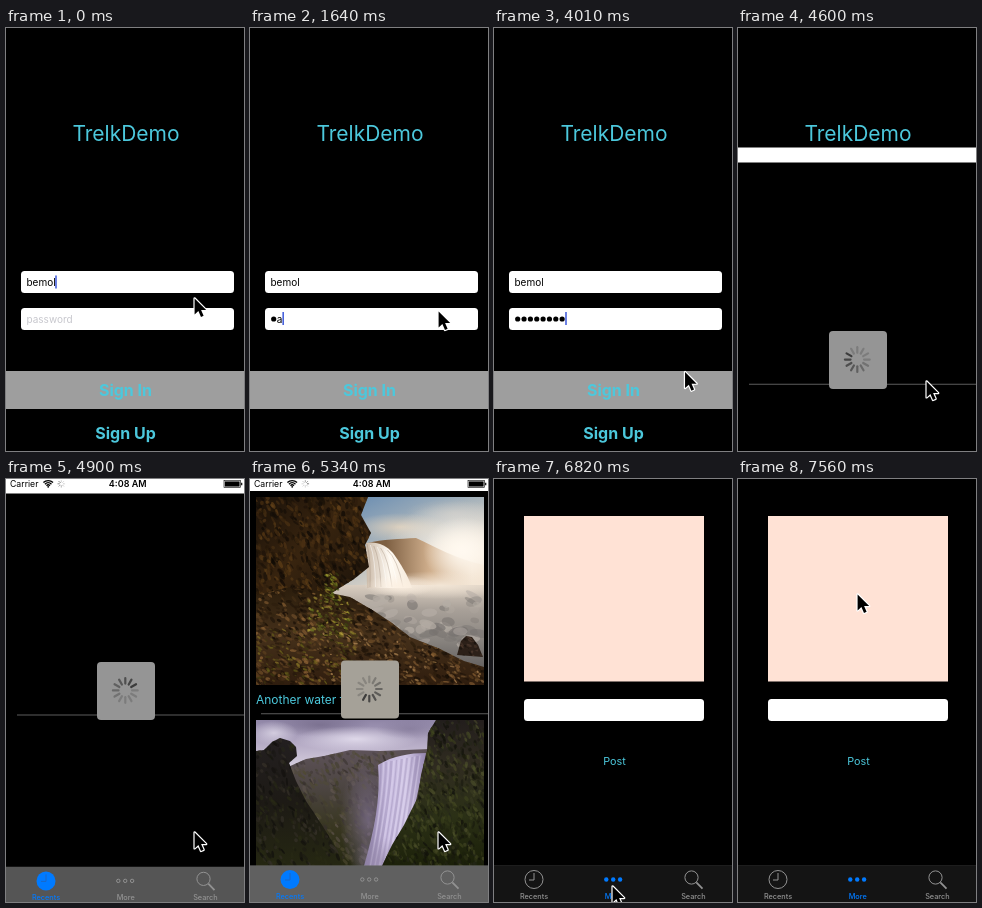
These frames come from a looping animation (238 px wide and 423 px high, 8 s). An HTML page with a canvas:

```html
<!DOCTYPE html>
<html lang="en">
<head>
<meta charset="utf-8">
<title>App demo</title>
<style>
  html, body { margin: 0; width: 100%; height: 100%; overflow: hidden; background: #000; }
  canvas { display: block; width: 238px; height: 423px; }
</style>
</head>
<body>
<canvas id="stage"></canvas>
<script>
const W = 238, H = 423, LOOP = 8000, TICK = 148.3;
const TEAL = '#4cc8dc', BLUE = '#007aff', GREY = '#929292';
const FONT = 'Inter, Roboto, "Liberation Sans", sans-serif';
const SCALE = Math.max(1, window.devicePixelRatio || 1);

function makeCanvas(el) {
  el.width = W * SCALE;
  el.height = H * SCALE;
  const c = el.getContext('2d');
  c.scale(SCALE, SCALE);
  return c;
}
const ctx = makeCanvas(document.getElementById('stage'));

// ---------- helpers ----------
function rect(x, y, w, h, fill, r = 0) {
  ctx.fillStyle = fill;
  ctx.beginPath();
  ctx.roundRect(x, y, w, h, r);
  ctx.fill();
}
function text(str, x, y, size, fill, align = 'left', weight = 400) {
  ctx.font = `${weight} ${size}px ${FONT}`;
  ctx.textAlign = align;
  ctx.fillStyle = fill;
  ctx.fillText(str, x, y);
}
function disc(x, y, r, fill) {
  ctx.fillStyle = fill;
  ctx.beginPath();
  ctx.arc(x, y, r, 0, Math.PI * 2);
  ctx.fill();
}
function ring(x, y, r, color, width = 1) {
  ctx.strokeStyle = color;
  ctx.lineWidth = width;
  ctx.beginPath();
  ctx.arc(x, y, r, 0, Math.PI * 2);
  ctx.stroke();
}
function line(points, color, width = 1) {
  ctx.strokeStyle = color;
  ctx.lineWidth = width;
  ctx.beginPath();
  points.forEach(([x, y]) => ctx.lineTo(x, y));
  ctx.stroke();
}
const clamp = (v) => Math.min(1, Math.max(0, v));
const ease = (t, a, b) => {
  const p = clamp((t - a) / (b - a));
  return p * p * (3 - 2 * p);
};

// ---------- landscape pictures ----------
function makePhotos() {
  const c = makeCanvas(document.createElement('canvas'));
  let seed = 7;
  const rnd = () => (seed = (seed * 16807) % 2147483647) / 2147483647;
  const grad = (x0, y0, x1, y1, ...cols) => {
    const g = c.createLinearGradient(x0, y0, x1, y1);
    cols.forEach((col, i) => g.addColorStop(i / (cols.length - 1), col));
    return g;
  };
  const poly = (pts, fill) => {
    const p = new Path2D('M' + pts + 'Z');
    c.fillStyle = fill;
    c.fill(p);
    return p;
  };
  // soft elliptical patch of one colour
  const glow = (x, y, rx, ry, rgb, a) => {
    c.save();
    c.translate(x, y);
    c.scale(rx, ry);
    const g = c.createRadialGradient(0, 0, 0, 0, 0, 1);
    g.addColorStop(0, `rgba(${rgb},${a})`);
    g.addColorStop(1, `rgba(${rgb},0)`);
    c.fillStyle = g;
    c.fillRect(-1, -1, 2, 2);
    c.restore();
  };
  const speckle = (path, n, x, y, w, h, size, cols, tilt = 0) => {
    c.save();
    if (path) c.clip(path);
    for (let i = 0; i < n; i++) {
      c.fillStyle = cols[i % cols.length];
      c.globalAlpha = 0.25 + rnd() * 0.5;
      c.beginPath();
      c.ellipse(x + rnd() * w, y + rnd() * h, size * (0.5 + rnd()), size * (0.3 + rnd() * 0.4), tilt + rnd(), 0, 7);
      c.fill();
    }
    c.restore();
  };
  const frame = (x, y, w, h, draw) => {
    c.save();
    c.beginPath();
    c.rect(x, y, w, h);
    c.clip();
    draw();
    c.restore();
  };

  frame(6, 18, 228, 188, () => {
    c.fillStyle = grad(110, 18, 150, 110, '#6d8fb2', '#a9b4bb', '#e9dccb');
    c.fillRect(6, 18, 228, 188);
    glow(150, 48, 50, 14, '232,214,190', 0.8);
    glow(205, 34, 50, 14, '196,196,194', 0.7);
    glow(210, 70, 75, 48, '255,246,234', 1);
    poly('118,64 C132,60 150,60 166,59 C186,68 206,80 234,86 L234,114 118,112', grad(136, 0, 222, 0, '#7d5f42', '#cfae8c', '#f4e5d3'));
    glow(213, 72, 40, 34, '255,249,240', 1);
    c.fillStyle = grad(0, 100, 0, 190, '#e6d9ca', '#a9a199', '#8a8580', '#63605f');
    c.fillRect(70, 106, 164, 100);
    glow(190, 106, 75, 14, '244,231,215', 0.95);
    speckle(null, 70, 110, 116, 124, 50, 7, ['#b5ada5', '#77726f'], -0.4);
    poly('116,64 C126,62 136,66 143,74 C150,84 158,96 162,109 L117,109', grad(116, 0, 164, 0, '#c9b8a6', '#fffaf2', '#f3e6d6'));
    for (let i = 0; i < 7; i++) {
      c.strokeStyle = i % 2 ? 'rgba(255,255,255,.5)' : 'rgba(150,130,112,.35)';
      c.beginPath();
      c.moveTo(117 + i * 3.4, 65 + i);
      c.quadraticCurveTo(121 + i * 4.4, 80, 120 + i * 5.5, 108);
      c.stroke();
    }
    glow(150, 107, 36, 11, '252,240,226', 0.95);
    const cliff = poly('6,18 118,18 111,36 121,54 115,66 119,88 104,100 88,110 60,128 6,150', grad(6, 18, 112, 110, '#1a1109', '#38240f', '#1e140a'));
    speckle(cliff, 900, 6, 18, 116, 130, 3, ['#0d0905', '#4f3314', '#241709', '#120c06', '#654319'], 0.6);
    const bank = poly('6,116 40,108 70,112 100,118 124,132 142,144 160,158 190,170 214,182 234,188 234,206 6,206', grad(0, 108, 0, 206, '#2b1d0c', '#45301a', '#2f1d0e'));
    speckle(bank, 1300, 6, 106, 228, 100, 2.6, ['#120b05', '#5f4120', '#2b1c0c', '#1d1208', '#8d6335']);
    speckle(bank, 130, 60, 150, 174, 56, 1.8, ['#b98d58', '#96703f']);
    const rock = poly('207,176 211,162 216,157 222,158 228,166 233,178', '#2c2018');
    speckle(rock, 40, 206, 156, 30, 22, 2, ['#150f0a', '#574033']);
    speckle(null, 130, 58, 116, 44, 42, 1.8, ['#6f7a22', '#95912c', '#39420f', '#bba83c']);
    speckle(null, 50, 75, 95, 13, 28, 1.8, ['#75801f', '#a59d35', '#414c12']);
    speckle(bank, 150, 8, 150, 100, 54, 2, ['#6a6419', '#857226', '#3e3a10']);
  });

  frame(6, 241, 228, 146, () => {
    c.fillStyle = grad(0, 241, 0, 290, '#8f85a6', '#b6acc6', '#d8d1e0');
    c.fillRect(6, 241, 228, 146);
    glow(70, 246, 50, 12, '106,96,126', 0.6);
    glow(106, 260, 62, 13, '228,222,238', 0.9);
    glow(24, 254, 24, 12, '222,216,232', 0.8);
    glow(160, 250, 34, 10, '120,110,142', 0.5);
    const hill = poly('38,288 56,280 74,277 100,271 130,272 180,270 180,387 30,387', grad(0, 272, 0, 387, '#5d5258', '#4b4440', '#383620', '#262812'));
    speckle(hill, 650, 30, 272, 120, 115, 2.8, ['#37302d', '#61564f', '#403d2a', '#4f4a31'], 0.4);
    glow(118, 340, 28, 62, '128,114,146', 0.75);
    poly('128,286 C142,277 160,274 176,274 C170,304 162,340 152,387 L114,387 C124,352 131,320 128,286', grad(116, 0, 176, 0, '#8b7ea3', '#c6bade', '#cfc4e4', '#9486ae'));
    for (let i = 0; i < 16; i++) {
      c.strokeStyle = i % 2 ? 'rgba(232,224,246,.35)' : 'rgba(128,114,156,.25)';
      c.lineWidth = 1 + rnd() * 1.5;
      c.beginPath();
      c.moveTo(131 + i * 2.6, 284 - i * 0.5);
      c.quadraticCurveTo(131 + i * 2.2, 320, 118 + i * 2.3, 387);
      c.stroke();
    }
    glow(130, 382, 30, 24, '150,137,170', 0.6);
    const slope = poly('234,241 186,241 178,254 177,272 171,296 168,318 154,346 142,366 132,387 234,387', grad(180, 241, 190, 387, '#221d1c', '#302c20', '#2b3016', '#1b2009'));
    speckle(slope, 1000, 130, 241, 104, 146, 2.8, ['#12120b', '#3d421d', '#25261a', '#1a1c0d', '#4c4f2a'], 0.7);
    const pillar = poly('6,272 14,271 22,263 30,259 40,262 46,268 47,277 39,284 46,302 56,322 72,346 88,372 92,387 6,387', grad(0, 260, 0, 387, '#231f20', '#1d1a15', '#252712'));
    speckle(pillar, 420, 6, 258, 86, 130, 2.8, ['#100f0c', '#353028', '#292b15', '#1a1813'], 0.6);
  });
  return c.canvas;
}
const photos = makePhotos();

// ---------- parts ----------
function field(x, y, w) {
  rect(x, y, w, 22, '#fff', 3.5);
}
function caret(x, y, alpha) {
  rect(x, y, 1.4, 13, `rgba(45,75,215,${alpha})`);
}

const PASS = 'password';
const KEY_TICKS = [10, 11, 12, 13, 21, 22, 23, 24];

function passwordField(k) {
  const typed = KEY_TICKS.filter((n) => n <= k).length;
  const shown = typed && (k === KEY_TICKS[typed - 1] || (typed === 8 && k < 27));
  if (!typed) text(PASS, 20.5, 295, 10, '#c7c7cd');
  const dots = shown ? typed - 1 : typed;
  for (let i = 0; i < dots; i++) disc(23.7 + i * 6.35, 291, 2.6, '#000');
  let x = 20.5 + dots * 6.35;
  if (shown) {
    text(PASS[dots], x, 295, 10, '#000');
    x += ctx.measureText(PASS[dots]).width;
  }
  if (k < 2) return;
  const half = k === 7 || k === 18;
  const off = k === 8 || k === 9 || k === 19 || k === 20;
  caret(x, 284, off ? 0 : half ? 0.4 : 1);
}

function signIn(k) {
  rect(0, 0, W, H, '#000');
  text('TrelkDemo', 120, 113, 21, TEAL, 'center');
  field(15, 243, 213);
  text('bemol', 20.5, 258, 10, '#000');
  if (k < 2) caret(49.3, 247.5, k ? 0.4 : 1);
  field(15, 280, 213);
  passwordField(k);
  rect(0, 343, W, 38, '#9e9e9e');
  ctx.globalAlpha = k === 29 ? 0.3 : 1;
  text('Sign In', 119.5, 368, 16, TEAL, 'center', 700);
  ctx.globalAlpha = 1;
  text('Sign Up', 119.5, 411, 16, TEAL, 'center', 700);
}

function spokes(x, y, n, r0, r1, width, head, rgb) {
  ctx.lineCap = 'round';
  for (let i = 0; i < n; i++) {
    const a = (i / n) * Math.PI * 2;
    const behind = (((head - i / n) % 1) + 1) % 1;
    const sx = Math.sin(a), sy = -Math.cos(a);
    line([[x + sx * r0, y + sy * r0], [x + sx * r1, y + sy * r1]],
      `rgba(${rgb},${0.25 + 0.65 * Math.max(0, 1 - behind * 1.7)})`, width);
  }
  ctx.lineCap = 'butt';
}

function hud(t, fill, alpha) {
  ctx.globalAlpha = alpha;
  rect(91, 181.5, 58, 58, fill, 4);
  const head = Math.round((0.835 + (t - 4600) / 1000) * 12) / 12;
  spokes(119.3, 210, 12, 6.8, 12.4, 2.2, head, '50,50,50');
  ctx.globalAlpha = 1;
}

function tabBar(fill, active) {
  rect(0, 386.5, W, 37, fill);
  rect(0, 386, W, 0.6, 'rgba(120,120,120,.35)');
  const tint = (i) => (i === active ? BLUE : GREY);
  if (active === 0) disc(40, 400.6, 9.5, BLUE);
  else ring(40, 400.5, 9, GREY);
  line([[40, 394], [40, 401], [35, 401]], active === 0 ? '#1c67c4' : GREY);
  for (const x of [112.3, 119.2, 126.1]) {
    if (active === 1) disc(x, 400.5, 2.2, BLUE);
    else ring(x, 400.5, 1.7, GREY);
  }
  ring(197.5, 398.5, 6.6, GREY);
  line([[202.3, 403.3], [208.5, 409.7]], GREY, 1.8);
  ['Recents', 'More', 'Search'].forEach((s, i) =>
    text(s, 40 + i * 79.7, 420, 7.3, tint(i), 'center', 500));
}

function statusText(t, busy) {
  text('Carrier', 4, 8.2, 8.7, '#000');
  for (const r of [2.4, 4.6, 6.8]) {
    ctx.strokeStyle = '#000';
    ctx.lineWidth = 1.4;
    ctx.beginPath();
    ctx.arc(42.2, 8.4, r, Math.PI * 1.25, Math.PI * 1.75);
    ctx.stroke();
  }
  disc(42.2, 7.8, 0.9, '#000');
  if (busy) spokes(55.3, 4.8, 8, 1.8, 3.4, 0.8, t / 1000, '60,60,60');
  text('4:08 AM', 121.7, 8.2, 9, '#000', 'center', 600);
  ctx.strokeStyle = '#000';
  ctx.lineWidth = 0.6;
  ctx.strokeRect(218, 1.6, 16.4, 6.8);
  rect(218.8, 2.4, 14.8, 5.2, '#000');
  rect(235.1, 3.7, 1.2, 2.6, '#000');
}

function recents(t, k) {
  // critically damped slide from the bottom edge
  const s = Math.max(0, t - 4460.4) * 0.01826;
  const y = H * (1 + s) * Math.exp(-s);
  const loaded = k >= 35;
  ctx.save();
  ctx.translate(0, y);
  rect(0, 0, W, H, '#000');
  rect(0, -2, W, loaded ? 14 : 15, '#fff');
  if (loaded) {
    ctx.drawImage(photos, 0, 0, W, H);
    text('Another water fall?', 6, 224.5, 12, TEAL);
  }
  rect(11, 234.2, W - 11, 1, '#5c5c5c');
  tabBar(loaded ? '#606060' : '#555', 0);
  const fade = k < 37 ? 1 : k === 37 ? 0.45 : 0;
  if (fade) hud(t, loaded ? '#a5a198' : '#959595', fade);
  ctx.restore();
  statusText(t, k >= 32 && k < 38);
}

function more() {
  rect(0, 0, W, H, '#000');
  rect(30, 37, 180, 165.5, '#ffe2d5');
  field(30, 220, 180);
  text('Post', 120.5, 286, 10.8, TEAL, 'center');
  tabBar('#141414', 1);
}

function pointer(t) {
  const toButton = ease(t, 3480, 4160);
  const toTab = ease(t, 5640, 6530);
  const toPage = ease(t, 7120, 7560);
  const x = 188 + 6 * Math.sin(toButton * Math.PI) - 70 * toTab + toPage;
  const y = 270 + 13 * ease(t, 0, 445) + 70 * toButton + 54 * toTab - 292 * toPage;
  const arrow = new Path2D('M0,0 0,16 3.8,12.7 6.4,18.6 9,17.4 6.5,11.7 11.6,11.6Z');
  ctx.save();
  ctx.translate(x + 0.6, y + 0.4);
  ctx.strokeStyle = '#fff';
  ctx.lineWidth = 2.4;
  ctx.lineJoin = 'round';
  ctx.stroke(arrow);
  ctx.fillStyle = '#000';
  ctx.fill(arrow);
  ctx.restore();
}

function render(now) {
  const k = Math.min(51, Math.floor(((now % LOOP) + 6) / TICK));
  const t = k * TICK;
  ctx.clearRect(0, 0, W, H);
  if (k < 34) signIn(k);
  if (k >= 46) more();
  else if (k >= 30) recents(t, k);
  pointer(t);
}

let start;
function loop(now) {
  if (start === undefined) start = now;
  render(now - start);
  requestAnimationFrame(loop);
}
render(0);
requestAnimationFrame(loop);
</script>
</body>
</html>
```
